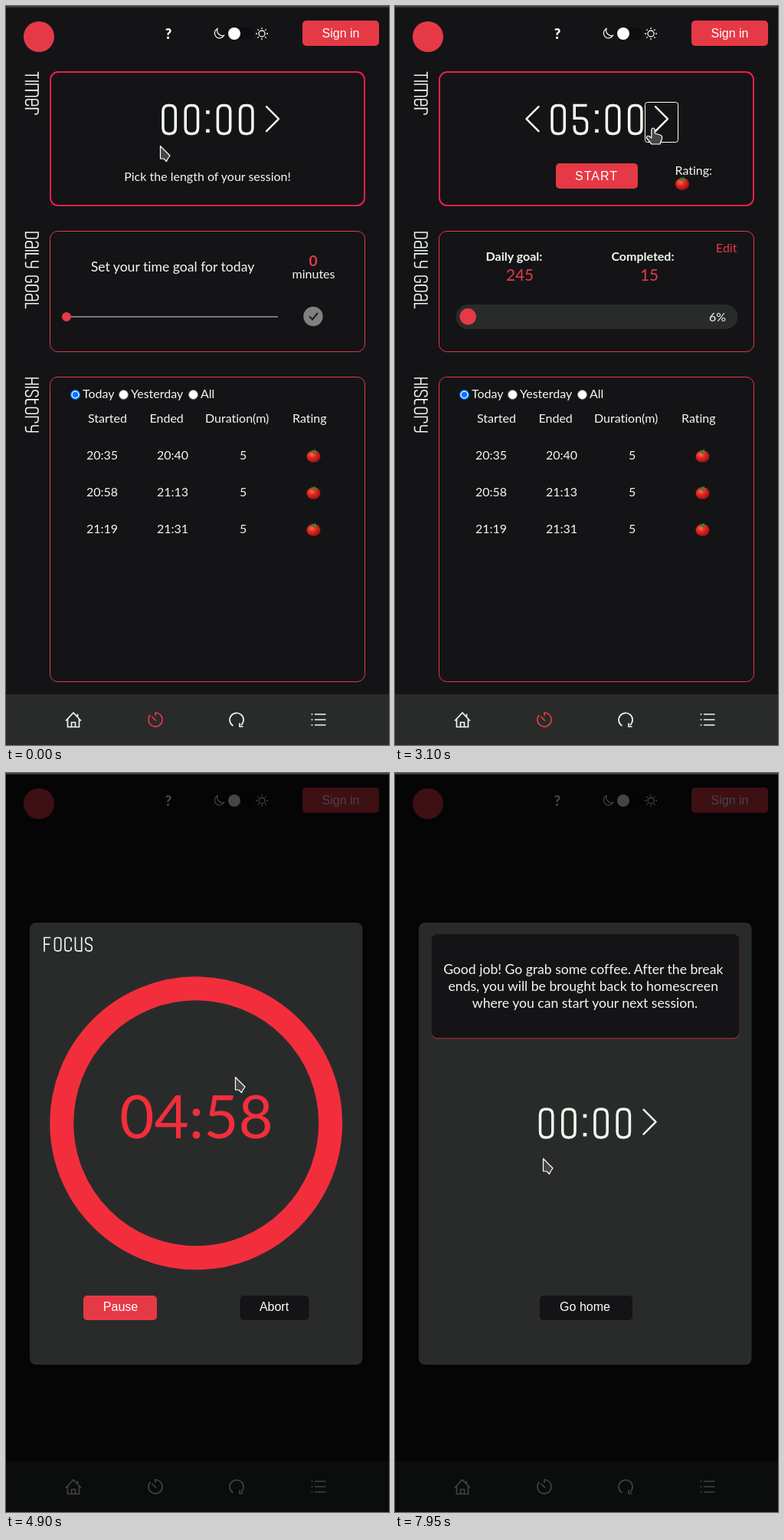
An HTML page for the animation above (8000 ms loop, 500x963 px).

```html
<!DOCTYPE html>
<html lang="en">
<head>
<meta charset="utf-8">
<title>Focus timer</title>
<style>
  :root { --red: #e63946; --ink: #f1faee; --bg: #141417; --panel: #292b2b; }
  html, body { margin: 0; width: 100%; height: 100%; overflow: hidden; background: var(--bg); }
  svg { display: block; }
  #stage { width: 500px; height: 963px; }
  text { font: 16px Lato, sans-serif; fill: var(--ink); font-variant-ligatures: none; }
  .ui { font: 16px "Liberation Sans", Arial, sans-serif; fill: #fff; }
  .mid { text-anchor: middle; }
  .big { font-size: 17.6px; }
  .red { fill: var(--red); }
  .num { font-size: 20.8px; }
  .line { fill: none; stroke: var(--ink); stroke-width: 1.7; }
  .letters { fill: none; stroke: var(--ink); stroke-width: 1.9; }
  .card { fill: none; stroke: var(--red); stroke-width: 1; }
  .card.hot { stroke: #ee1f49; stroke-width: 2; x: 58px; width: 410px; }
  #timerCard.hot { y: 86px; height: 174px; }
  #goalCard.hot { y: 294px; height: 156px; }
  #goalCard.hot ~ #setup #slider { transform: translateY(-1px); }
  .active { stroke: var(--red); }
  .off { display: none; }
</style>
</head>
<body>
<svg id="stage" viewBox="0 0 500 963">
  <defs>
    <radialGradient id="skin" cx=".38" cy=".35" r=".75">
      <stop offset="0" stop-color="#ff6a55"/>
      <stop offset=".4" stop-color="#e3261f"/>
      <stop offset="1" stop-color="#8d0d10"/>
    </radialGradient>
    <g id="tomato">
      <ellipse cy="1" rx="9" ry="7.8" fill="url(#skin)"/>
      <path d="M-6-4L-1.5-5.5-3-8 0-6.5 2-9 2.5-6 7-5 2-3.8 1-1-1-3.8Z" fill="#4f7a2c"/>
    </g>
    <path id="chevron" d="M0-16L16 0 0 16" fill="none" stroke="#f1faee" stroke-width="2.4" stroke-linecap="round" stroke-linejoin="round"/>
  </defs>

  <rect width="500" height="963" fill="var(--bg)"/>

  <!-- header -->
  <circle cx="43" cy="40" r="20" class="red"/>
  <text x="212" y="42.5" class="mid" style="font-size:18px;font-weight:900">?</text>
  <path class="line" style="stroke-width:1.3" d="M276 29.5A6.5 6.5 0 1 0 284.5 38.5A7 7 0 0 1 276 29.5Z"/>
  <rect x="289" y="28" width="34" height="16" rx="8" fill="#0e0e10"/>
  <circle cx="298" cy="36" r="8" fill="#fff"/>
  <g class="line" style="stroke-width:1.3">
    <circle cx="334" cy="36" r="4"/>
    <g id="rays"></g>
  </g>
  <rect x="387" y="19" width="100" height="33" rx="5" class="red"/>
  <text x="437" y="41" class="ui mid">Sign in</text>

  <g id="page">
    <g class="letters" data-word="Timer" data-at="42 86.5" data-turn="90" data-scale=".82" data-gap="5"></g>
    <g class="letters" data-word="Daily Goal" data-at="42 295" data-turn="90" data-scale=".82" data-gap="5"></g>
    <g class="letters" data-word="History" data-at="42 485" data-turn="90" data-scale=".82" data-gap="5"></g>

    <!-- timer card -->
    <rect id="timerCard" class="card" x="57.5" y="85.5" width="411" height="175" rx="10"/>
    <use href="#chevron" x="340" y="147.2"/>
    <g id="idle">
      <g class="letters" data-word="00:00" data-at="205 129.5" data-scale="1.85" data-gap="7"></g>
      <text x="263" y="228" class="mid">Pick the length of your session!</text>
    </g>
    <g id="picked">
      <g class="letters" data-word="05:00" data-at="205 129.5" data-scale="1.85" data-gap="7"></g>
      <use href="#chevron" transform="translate(187.5 147.2) scale(-1 1)"/>
      <rect x="326.5" y="125.5" width="43" height="52" rx="3" fill="none" stroke="#fff"/>
      <rect x="210" y="205" width="107" height="33" rx="5" class="red"/>
      <text x="235" y="227" class="ui" style="letter-spacing:1px">START</text>
      <text x="365.5" y="220">Rating:</text>
      <use href="#tomato" x="375" y="231"/>
    </g>

    <!-- goal card -->
    <rect id="goalCard" class="card" x="57.5" y="293.5" width="411" height="157" rx="10"/>
    <g id="setup">
      <text x="217.5" y="346" class="mid big">Set your time goal for today</text>
      <text id="minutes" x="401" y="339" class="mid red" style="font-size:19.2px;font-weight:700">0</text>
      <text x="401.5" y="355" class="mid">minutes</text>
      <g id="slider">
        <path d="M79 405H355" stroke="#757577" stroke-width="2"/>
        <path id="filled" stroke="var(--red)" stroke-width="2"/>
        <circle id="thumb" cy="405" r="6" class="red"/>
        <circle id="okDisc" cx="401" cy="404.5" r="12.7"/>
        <path d="M396 404.5L400 408.5 407 400" fill="none" stroke="#1c1c1e" stroke-width="2"/>
      </g>
    </g>
    <g id="progress">
      <text x="155.5" y="332" class="mid" style="font-weight:700">Daily goal:</text>
      <text x="163" y="358" class="mid red num">245</text>
      <text x="323.5" y="332" class="mid" style="font-weight:700">Completed:</text>
      <text x="332" y="358" class="mid red num">15</text>
      <text x="419" y="321" class="red">Edit</text>
      <rect x="79.5" y="389" width="368" height="32" rx="16" fill="var(--panel)"/>
      <rect id="bar" x="84.5" y="394" height="21.5" rx="10.75" class="red"/>
      <text x="410" y="411">6%</text>
    </g>

    <!-- history card -->
    <rect class="card" x="57.5" y="483.5" width="411" height="397" rx="10"/>
    <circle cx="90.5" cy="506.5" r="5.8" fill="#fff" stroke="#0075ff" stroke-width="1.4"/>
    <circle cx="90.5" cy="506.5" r="3.8" fill="#0075ff"/>
    <g fill="#fff" stroke="#767676">
      <circle cx="153.5" cy="506.5" r="6"/>
      <circle cx="244.5" cy="506.5" r="6"/>
    </g>
    <text x="100" y="511">Today</text>
    <text x="163" y="511">Yesterday</text>
    <text x="254" y="511">All</text>
    <text x="107" y="543">Started</text>
    <text x="187.5" y="543">Ended</text>
    <text x="260" y="543">Duration(m)</text>
    <text x="374" y="543">Rating</text>
    <g id="rows"></g>
  </g>

  <!-- bottom bar -->
  <rect y="897" width="500" height="66" fill="var(--panel)"/>
  <g class="line">
    <path transform="translate(88 930)" d="M-10 1.5L0-9 10 1.5M5.5-3.5V-7.5M-7.5-1V9.5H7.5V-1M-2.5 9V3.5H2.5V9"/>
    <path id="navTimer" transform="translate(195 930)" d="M0-5V-9A9 9 0 1 1-6.5-6.2M-4.5-4L1 1.5"/>
    <path transform="translate(301 930)" d="M-4.5 8A9 9 0 1 1 6 7M8.5 9H4V4.5"/>
    <path transform="translate(408 930)" d="M-5-7H9.5M-5 0H9.5M-5 7H9.5M-9.5-7H-7.5M-9.5 0H-7.5M-9.5 7H-7.5"/>
  </g>

  <rect id="shade" width="500" height="963" fill="#000"/>

  <g id="modal">
    <rect x="31" y="195" width="434.5" height="576" rx="8" fill="var(--panel)"/>
    <g id="focus">
      <g class="letters" data-word="FOCUS" data-at="50 214.5" data-scale=".87" data-gap="6"></g>
      <circle cx="248.2" cy="456.3" r="175.5" fill="none" stroke="#f22e3c" stroke-width="31"/>
      <path id="notch" d="M238 266.2L243 265.8M240.5 296L246 295.6" stroke="#fff" stroke-width="1.3"/>
      <text id="clock" x="248.5" y="476" class="mid" style="font-size:78px;fill:#f22e3c">05:00</text>
      <rect x="101" y="681" width="96" height="32" rx="5" class="red"/>
      <text x="149.5" y="701" class="ui mid">Pause</text>
      <rect x="305.5" y="681" width="90" height="32" rx="5" fill="var(--bg)"/>
      <text x="350" y="701" class="ui mid">Abort</text>
    </g>
    <g id="done">
      <rect x="47.5" y="210.5" width="402" height="136" rx="8" fill="#a82a35"/>
      <rect x="47.5" y="210" width="402" height="135.3" rx="8" fill="var(--bg)"/>
      <text class="mid big">
        <tspan x="248" y="262">Good job! Go grab some coffee. After the break</tspan>
        <tspan x="248" y="284">ends, you will be brought back to homescreen</tspan>
        <tspan x="248" y="306">where you can start your next session.</tspan>
      </text>
      <g class="letters" data-word="00:00" data-at="189.5 438" data-scale="1.85" data-gap="7"></g>
      <use href="#chevron" x="324.5" y="454.7"/>
      <rect x="189" y="681" width="121" height="32" rx="5" fill="var(--bg)"/>
      <text x="248" y="701" class="ui mid">Go home</text>
    </g>
  </g>

  <rect width="500" height="2" fill="#39393b"/>

  <g id="cursor" fill="#454547" stroke="#fff" stroke-width="1.2" stroke-linejoin="round">
    <path id="arrow" d="M.5.5V17H5L8.5 20.5 10.5 16.5 13 13Z"/>
    <path id="hand" d="M-2.2 2Q0-2 2.2 2V7L9 9Q12.5 10 11.5 14L9 21H-2L-8.5 13Q-9 9.5-5.5 10.5L-2.2 13Z"/>
  </g>
</svg>

<script>
const $ = id => document.getElementById(id);
const NS = "http://www.w3.org/2000/svg";

// Narrow unicase lettering: advance width and stroke, cap height 20
const O = w => `M0 4Q0 0 4 0H${w - 4}Q${w} 0 ${w} 4V16Q${w} 20 ${w - 4} 20H4Q0 20 0 16Z`;
const C = "M9.5 6V4Q9.5 0 5.5 0H4Q0 0 0 4V16Q0 20 4 20H5.5Q9.5 20 9.5 16V";
const glyphs = {
  "0": [8.8, O(8.8)],
  "5": [8.8, "M8.8 0H0V9H4.8Q8.8 9 8.8 13V16Q8.8 20 4.8 20H4Q0 20 0 16V14"],
  ":": [0, "M-.3 4.5H.3V5.1H-.3ZM-.3 17.7H.3V18.3H-.3Z"],
  " ": [4, ""],
  F: [9.5, "M0 21V0H9.5M0 10H8"],
  O: [9.5, O(9.5)],
  o: [9.5, O(9.5)],
  C: [9.5, C + "14"],
  G: [9.5, C + "11H5"],
  U: [9.5, "M0-1V16Q0 20 4 20H9.5M9.5-1V21"],
  S: [9.5, "M9.5 5V4Q9.5 0 5.5 0H4Q0 0 0 4V6Q0 8.5 3 9.5L6.5 10.8Q9.5 12 9.5 14V16Q9.5 20 5.5 20H4Q0 20 0 16V15"],
  T: [9, "M-1 0H10M4.5 0V21"],
  i: [0, "M0-1V21"],
  m: [19, "M0 21V0H15.5Q19 0 19 4V21M9.5 0V21"],
  e: [9.5, "M0 10H9.5V4Q9.5 0 5.5 0H4Q0 0 0 4V16Q0 20 4 20H5.5Q9.5 20 9.5 16V14.5"],
  r: [9, "M0 21V0H5Q9 0 9 4V6"],
  D: [9.5, "M0 0H5.5Q9.5 0 9.5 4V16Q9.5 20 5.5 20H0Z"],
  a: [9.5, "M.5 4Q.5 0 4 0H5.5Q9.5 0 9.5 4V20H4Q0 20 0 16V13Q0 9.5 4 9.5H9.5"],
  l: [7, "M0-1V20H8"],
  y: [9.5, "M0-1V7Q0 11 4 11H9.5M9.5-1V16Q9.5 20 5.5 20H1"],
  H: [9.5, "M0-1V21M9.5-1V21M0 10H9.5"],
  t: [8, "M0-1V16Q0 20 4 20H8M0 5H7"]
};
glyphs.s = glyphs.S;

function add(parent, tag, attrs, text = "") {
  const el = document.createElementNS(NS, tag);
  for (const k in attrs) el.setAttribute(k, attrs[k]);
  el.textContent = text;
  parent.append(el);
}

for (const g of document.querySelectorAll("[data-word]")) {
  const { word, at, turn = 0, scale, gap } = g.dataset;
  g.setAttribute("transform", `translate(${at}) rotate(${turn}) scale(${scale})`);
  g.setAttribute("role", "img");
  g.setAttribute("aria-label", word);
  let x = 0;
  for (const ch of word) {
    const [w, d] = glyphs[ch];
    add(g, "path", { d, transform: `translate(${x} 0)` });
    x += w + +gap;
  }
}

for (let a = 0; a < 360; a += 45)
  add($("rays"), "path", { d: "M334 30V28", transform: `rotate(${a} 334 36)` });

[["20:35", "20:40"], ["20:58", "21:13"], ["21:19", "21:31"]].forEach(([from, to], i) => {
  const y = 591 + i * 48, rows = $("rows");
  add(rows, "text", { x: 105, y }, from);
  add(rows, "text", { x: 197, y }, to);
  add(rows, "text", { x: 305, y }, "5");
  add(rows, "use", { href: "#tomato", x: 401.5, y: y - 5 });
});

const LOOP = 8000, GOAL = 245;
const at = { drag: 750, dragEnd: 850, save: 1600, pick: 2900, start: 3600, done: 7650 };

// Pointer stops: time, x, y
const stops = [
  [0, 201, 182], [150, 201, 182], [500, 79, 404], [at.drag, 79, 404], [at.dragEnd, 174, 404],
  [1000, 174, 404], [1200, 396, 400], [1340, 399, 398], [1650, 399, 398], [2480, 337, 159],
  [3150, 337, 159], [3550, 292, 217], [4520, 292, 217], [4890, 299, 396], [5060, 299, 396],
  [5400, 205, -30], [at.done, 200, -30], [7750, 197, 262], [7940, 197, 262], [7950, 193, 502], [LOOP, 193, 502]
];

const ramp = (t, a, b) => Math.min(1, Math.max(0, (t - a) / (b - a)));
const smooth = p => p * p * (3 - 2 * p);
const show = (id, on) => $(id).classList.toggle("off", !on);

function pointer(t) {
  const i = stops.findIndex(s => s[0] > t);
  const [t0, x0, y0] = stops[i - 1], [t1, x1, y1] = stops[i];
  const p = smooth(ramp(t, t0, t1));
  return [x0 + (x1 - x0) * p, y0 + (y1 - y0) * p];
}

function render(t) {
  const [x, y] = pointer(t);
  const within = (l, top, r, b) => x > l && x < r && y > top && y < b;
  const running = t >= at.start, saved = t >= at.save, picked = t >= at.pick, done = t >= at.done;

  $("cursor").setAttribute("transform", `translate(${x} ${y})`);
  const onButton = !running && (!saved && t >= 1200 && within(386, 390, 416, 418)
    || within(326, 125, 370, 178) || picked && within(210, 205, 317, 238));
  show("hand", onButton);
  show("arrow", !onButton);
  $("timerCard").classList.toggle("hot", within(57, 85, 469, 261));
  $("goalCard").classList.toggle("hot", within(57, 293, 469, 451));

  show("page", !running);
  show("idle", !picked);
  show("picked", picked);
  show("setup", !saved);
  show("progress", saved);

  const value = Math.round(GOAL * ramp(t, at.drag, at.dragEnd) / 5) * 5;
  const thumbX = 79 + value * 95 / GOAL;
  $("minutes").textContent = value;
  $("thumb").setAttribute("cx", thumbX);
  $("filled").setAttribute("d", `M79.5 405H${thumbX}`);
  $("okDisc").setAttribute("fill", value ? "#e63946" : "#808080");
  $("bar").setAttribute("width", 21.5 * smooth(ramp(t, at.save, 2400)));

  const fade = 1 - (1 - ramp(t, at.start, at.start + 250)) ** 1.5;
  $("shade").setAttribute("opacity", 0.73 * fade);
  $("modal").setAttribute("opacity", fade);
  $("navTimer").classList.toggle("active", !running);
  show("modal", running);
  show("focus", !done);
  show("done", done);

  const left = 300 - Math.min(7, Math.max(0, Math.floor((t - 3660) / 490)));
  $("clock").textContent = `0${Math.floor(left / 60)}:${String(left % 60).padStart(2, "0")}`;
  show("notch", left <= 296);
}

const begin = performance.now();
function frame() {
  render((performance.now() - begin) % LOOP);
  requestAnimationFrame(frame);
}
frame();
</script>
</body>
</html>
```
